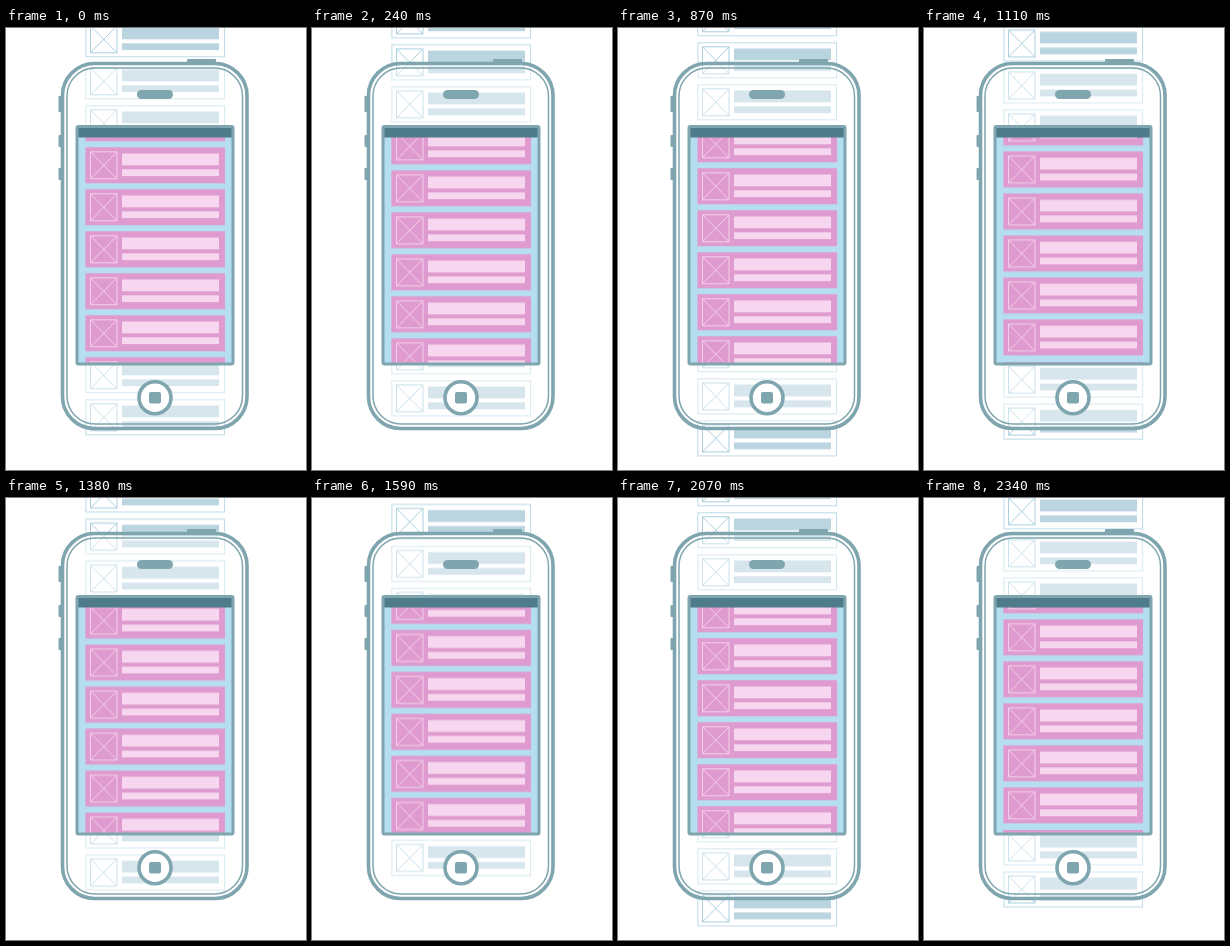
Animation of 300x442 px, one loop 2.37 s. Source, as an HTML page without scripts:

```html
<!DOCTYPE html>
<html lang="en">
<head>
<meta charset="utf-8">
<title>Endless list</title>
<style>
  html, body { margin: 0; height: 100%; overflow: hidden; background: #fff; }
  svg { display: block; width: 300px; height: 442px; }

  .wire { --card: #fff; --edge: #bcdae6; --icon: #a9cfdf; --bar: #bbd5e0; }
  .live { --card: #df9bcf; --edge: #df9bcf; --icon: #f4cfea; --bar: #f7d7ef; }
  .card { fill: var(--card); stroke: var(--edge); }
  .icon { fill: none; stroke: var(--icon); }
  .bar { fill: var(--bar); }

  .ink { fill: #7fa5af; }
  .line { fill: none; stroke: #7fa5af; }

  .scroll { animation: scroll 2370ms -2ms infinite; }
  .join { animation: join 2370ms -2ms infinite; }
  .enter { animation: enter 2370ms linear infinite; }

  /* Two rows (84px) pass per cycle, two cycles per loop. */
  @keyframes scroll {
    0%, 1.265% { transform: translateY(0); }
    1.266% { transform: translateY(-4.2px); animation-timing-function: steps(38); }
    49.367% { transform: translateY(-84px); }
    49.368% { transform: translateY(0); animation-timing-function: steps(40); }
    100% { transform: translateY(-84px); }
  }

  /* New rows wait at a fixed height, then follow the scroll. */
  @keyframes join {
    0% { transform: translateY(0); }
    29.114% { transform: translateY(0); animation-timing-function: steps(16); }
    49.367% { transform: translateY(-33.6px); }
    49.368% { transform: translateY(0); }
    79.747% { transform: translateY(0); animation-timing-function: steps(16); }
    100% { transform: translateY(-33.6px); }
  }

  @keyframes enter {
    0% { transform: translateX(250px); }
    14.346% { transform: translateX(250px); animation-timing-function: cubic-bezier(.333, 0, .667, 1); }
    29.747%, 49.367% { transform: translateX(0); }
    49.368% { transform: translateX(250px); }
    64.979% { transform: translateX(250px); animation-timing-function: cubic-bezier(.333, 0, .667, 1); }
    80.38%, 100% { transform: translateX(0); }
  }
</style>
</head>
<body>
<svg viewBox="0 0 300 442">
  <defs>
    <g id="row">
      <rect class="card" x="79.9" y=".5" width="138.7" height="35"/>
      <path class="icon" d="M84.5 4.5h26.5v27h-26.5zl26.5 27m0-27l-26.5 27"/>
      <rect class="bar" x="116" y="6.2" width="97" height="11.8"/>
      <rect class="bar" x="116" y="22" width="97" height="6.8"/>
    </g>
    <g id="pair">
      <use href="#row"/>
      <use href="#row" y="42"/>
    </g>
    <g id="list">
      <use href="#pair" y="-6.7"/>
      <use href="#pair" y="77.3"/>
      <use href="#pair" y="161.3"/>
      <use href="#pair" y="245.3"/>
      <use href="#pair" y="329.3"/>
    </g>
    <clipPath id="screen"><rect x="72" y="109" width="155" height="226"/></clipPath>
  </defs>

  <g class="wire">
    <g class="scroll"><use href="#list"/></g>
    <g class="join"><g class="enter"><use href="#pair" y="363"/></g></g>
  </g>

  <g class="ink">
    <rect x="52.5" y="68" width="3" height="16" rx="1"/>
    <rect x="52.5" y="107" width="3" height="12" rx="1"/>
    <rect x="52.5" y="140" width="3" height="12" rx="1"/>
    <rect x="181" y="31" width="29" height="4" rx="1"/>
  </g>
  <rect x="56.5" y="35.5" width="184.5" height="365" rx="32" fill="#fff" fill-opacity=".4"/>
  <rect class="line" x="56.5" y="35.5" width="184.5" height="365" rx="32" stroke-width="3.6"/>
  <rect class="line" x="61" y="40" width="175.5" height="356" rx="28" stroke-width="1.5"/>
  <rect class="ink" x="131" y="62" width="36" height="9" rx="4.5"/>
  <circle class="line" cx="149" cy="369.7" r="16" stroke-width="3.6" style="fill:#fff"/>
  <rect class="ink" x="143" y="364" width="12" height="11.5" rx="2"/>

  <rect x="71" y="98.5" width="156" height="237.5" fill="#b5dff0"/>
  <g class="live" clip-path="url(#screen)">
    <g class="scroll"><use href="#list"/></g>
    <g class="join"><g class="enter"><use href="#pair" y="363"/></g></g>
  </g>
  <rect x="72" y="99" width="154" height="10.5" fill="#4f7c8b"/>
  <rect class="line" x="71" y="98.5" width="156" height="237.5" rx="1.5" stroke-width="3"/>
</svg>
</body>
</html>
```
